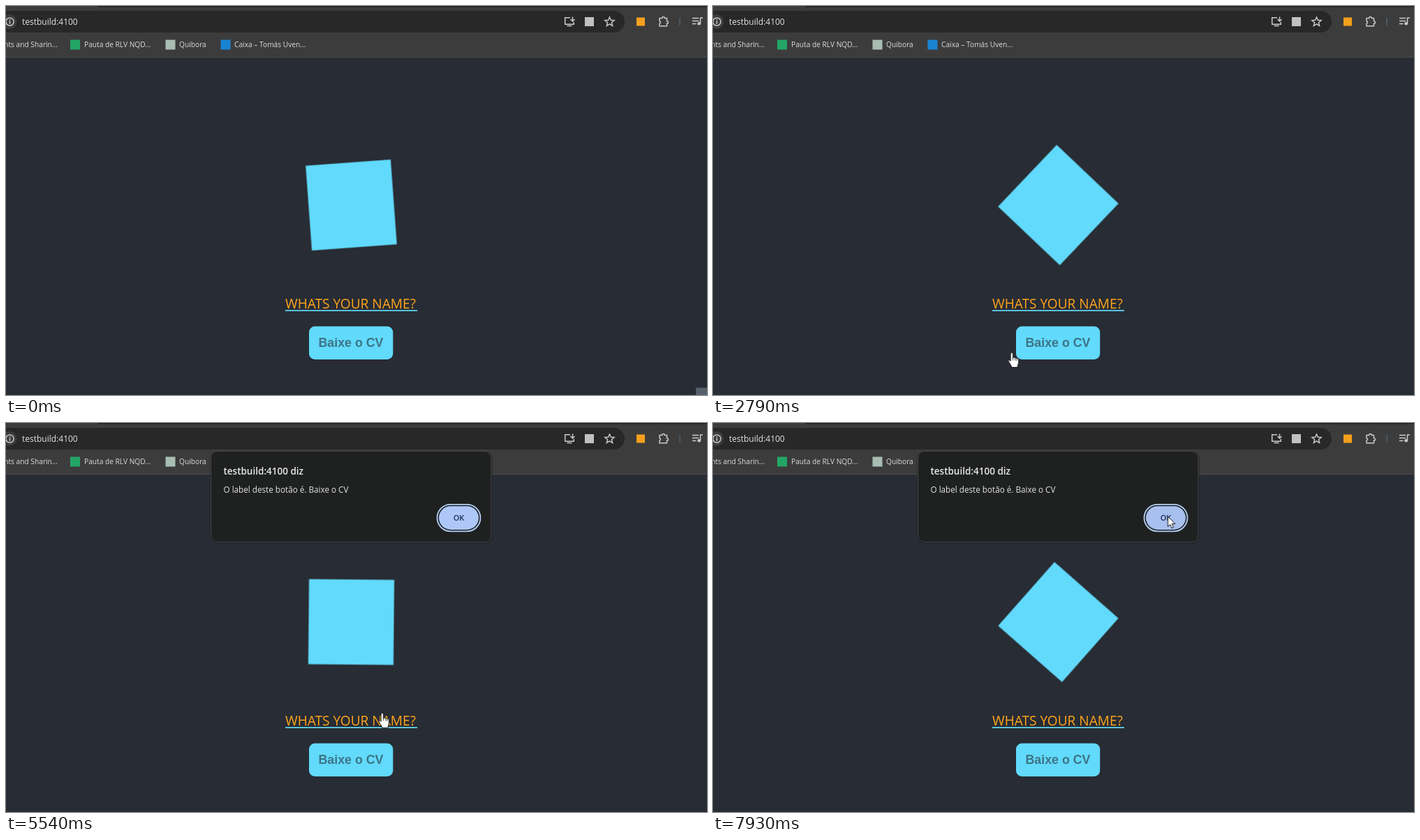
An HTML page that plays this animation: 1004x558 px, repeating every 8 s.

```html
<!DOCTYPE html>
<html lang="pt">
<head>
<meta charset="utf-8">
<title>Baixe o CV</title>
<style>
  html, body { margin: 0; width: 100%; height: 100%; overflow: hidden; background: #282c34; }
  svg { display: block; width: 100vw; height: 100vh; }
  text { font-family: "Open Sans", "Noto Sans", sans-serif; fill: #e3e3e3; }
  .mark { font-size: 10.2px; fill: #dcdcdc; }
  .url { font-size: 12px; }
  .title { font-size: 13.5px; font-weight: 600; fill: #e8e8e8; }
  .body { font-size: 11.7px; }
  .ok { font-size: 11px; font-weight: 600; fill: #1b2d55; text-anchor: middle; }
  .link { font-size: 19.1px; fill: #ffa51c; }
  .label { font: bold 17.8px "Liberation Sans", Arial, sans-serif; fill: #3c7486; }
  .icon { fill: none; stroke: #c9cac9; stroke-width: 1.5; }
  .pointer { fill: #fff; stroke: #111; stroke-width: 1; stroke-linejoin: round; }

  .spin { transform-origin: 494.5px 285.5px; animation: spin 8s linear infinite; }
  .cursor { animation: travel 8s linear infinite; }
  .arrow { animation: arrow 8s step-end infinite; }
  .hand { animation: hand 8s step-end infinite; }
  .dialog { animation: open 8s step-end infinite; }
  .fill { animation: hover 8s step-end infinite; }
  .corner { animation: leave 8s step-end infinite; }

  @keyframes spin {
    from { transform: rotate(-4.2deg); }
    to { transform: rotate(132.6deg); }
  }
  @keyframes travel {
    0%, 3% { transform: translate(1010px, 570px); }
    10% { transform: translate(560px, 452px); }
    17.5% { transform: translate(500px, 455px); }
    20.9% { transform: translate(450px, 458px); }
    25.25% { transform: translate(421.5px, 494.5px); }
    31.25%, 33.75% { transform: translate(423px, 498px); animation-timing-function: ease-in-out; }
    40%, 64.4% { transform: translate(499.5px, 480px); }
    69.25% { transform: translate(539.5px, 417px); }
    71.25% { transform: translate(470px, 200px); }
    73.6% { transform: translate(386px, 132px); }
    77.5%, 85% { transform: translate(333px, 107px); }
    87.6% { transform: translate(368.5px, 112px); }
    91.25% { transform: translate(520px, 118px); }
    94.75% { transform: translate(630px, 128px); }
    97.5%, 100% { transform: translate(651.5px, 134px); }
  }
  @keyframes arrow { 0% { opacity: 1; } 34.6% { opacity: 0; } 69.8%, 100% { opacity: 1; } }
  @keyframes hand { 0% { opacity: 0; } 34.6% { opacity: 1; } 69.8%, 100% { opacity: 0; } }
  @keyframes open { 0% { opacity: 0; } 59%, 100% { opacity: 1; } }
  @keyframes hover { 0% { fill: #adc8f8; } 95.2%, 100% { fill: #a8c0ee; } }
  @keyframes leave { 0% { opacity: 1; } 3.5%, 100% { opacity: 0; } }
</style>
</head>
<body>
<svg viewBox="0 0 1004 558" preserveAspectRatio="none">
  <rect width="1004" height="558" fill="#282c34"/>

  <!-- Browser bar -->
  <rect width="1004" height="74" fill="#3c3c3c"/>
  <rect x="132" width="872" height="1.5" fill="#202124"/>
  <rect y="73" width="1004" height="1" fill="#4b4c4e"/>
  <rect x="-30" y="7" width="916" height="31" rx="15.5" fill="#282828"/>
  <circle cx="5" cy="22.5" r="10.5" fill="#3c3c3c"/>
  <g class="icon">
    <circle cx="5.5" cy="22.5" r="5.6"/>
    <path d="M5.5 21.5v4.2M5.5 19v1.5"/>
    <path d="M808 16.7h-7.3v9.6h12.6V23M803.5 28.5h7M811.5 15.5v6M808.5 19l3 3 3-3"/>
    <path d="M864.5 16l1.9 4.3 4.7.4-3.6 3.1 1.1 4.6-4.1-2.5-4.1 2.5 1.1-4.6-3.6-3.1 4.7-.4z"/>
    <path d="M936 17.5h3.6a1.9 1.9 0 0 1 3.8 0h3.1v4a1.9 1.9 0 0 1 0 3.8v3.4H936v-3.5a1.9 1.9 0 0 0 0-3.7z"/>
    <path d="M983 17.5h9M983 21.5h9M983 25.5h5.5M994.5 25.5v-8.5h3.5"/>
  </g>
  <circle cx="992.7" cy="25.3" r="2.3" fill="#c9cac9"/>
  <rect x="829" y="16" width="13" height="13" fill="#c0c1c0"/>
  <rect x="903" y="16.5" width="12" height="12" fill="#f5a01d"/>
  <rect x="964.5" y="17" width="1.2" height="11" fill="#52687f"/>
  <text class="url" x="23" y="27">testbuild:4100</text>

  <text class="mark" x="74" y="59.3" text-anchor="end">nts and Sharin...</text>
  <rect x="92" y="48.5" width="14" height="14" fill="#23a566"/>
  <text class="mark" x="112" y="59.3">Pauta de RLV NQD...</text>
  <rect x="228.5" y="48.5" width="14" height="14" fill="#a9bdb4"/>
  <text class="mark" x="248" y="59.3">Quibora</text>
  <rect x="307.5" y="48.5" width="14" height="14" fill="#1a84d4"/>
  <text class="mark" x="327" y="59.3">Caixa – Tomás Uven...</text>

  <!-- Page -->
  <rect class="spin" x="433.5" y="224.5" width="122" height="122" fill="#61dafb"/>
  <text class="link" x="400" y="434">WHATS YOUR NAME?</text>
  <rect x="400" y="436" width="189" height="1.7" fill="#61dafb"/>
  <rect x="434" y="459.5" width="120.3" height="47.5" rx="8.5" fill="#61dafb"/>
  <text class="label" x="447.5" y="489">Baixe o CV</text>
  <rect class="corner" x="988" y="547.5" width="16" height="10.5" fill="#56616b"/>

  <!-- Alert -->
  <g class="dialog">
    <rect x="292" y="40" width="405" height="133" rx="11" fill="#000" opacity=".25"/>
    <rect x="293.5" y="40.5" width="401.5" height="130.5" rx="9.5" fill="#1f2020" stroke="#45474a"/>
    <text class="title" x="311.5" y="74">testbuild:4100 diz</text>
    <text class="body" x="311.5" y="100.3">O label deste botão é. Baixe o CV</text>
    <rect x="617.5" y="116.8" width="62" height="38.6" rx="19.3" fill="#1f2020" stroke="#b4d0fa" stroke-width="1.8"/>
    <rect class="fill" x="620" y="119.3" width="57" height="33.6" rx="16.8"/>
    <text class="ok" x="648.5" y="140.3">OK</text>
  </g>

  <g class="cursor">
    <path class="pointer arrow" d="M0 0v14.6l3.3-3 2.3 5.2 2.5-1.1-2.3-5.1h4.5z"/>
    <g class="hand">
      <path class="pointer" d="M-2 2a1.7 1.7 0 0 1 3.4 0V8l1-.6c1.2-.4 2 0 2.2.8 1-.5 2-.2 2.3.8 1.2-.4 2.6 0 2.6 1.6V14c0 3-1.5 4-1.5 7.5H-.5C-1 18-3.5 16-5 13c-.8-1.6 1-2.8 2.2-1.6l.8 1.1z"/>
      <path d="M1.4 8v3.5M4.6 8.4v3.3M7 9.2v2.9" fill="none" stroke="#111" stroke-width=".8"/>
    </g>
  </g>
</svg>
</body>
</html>
```
